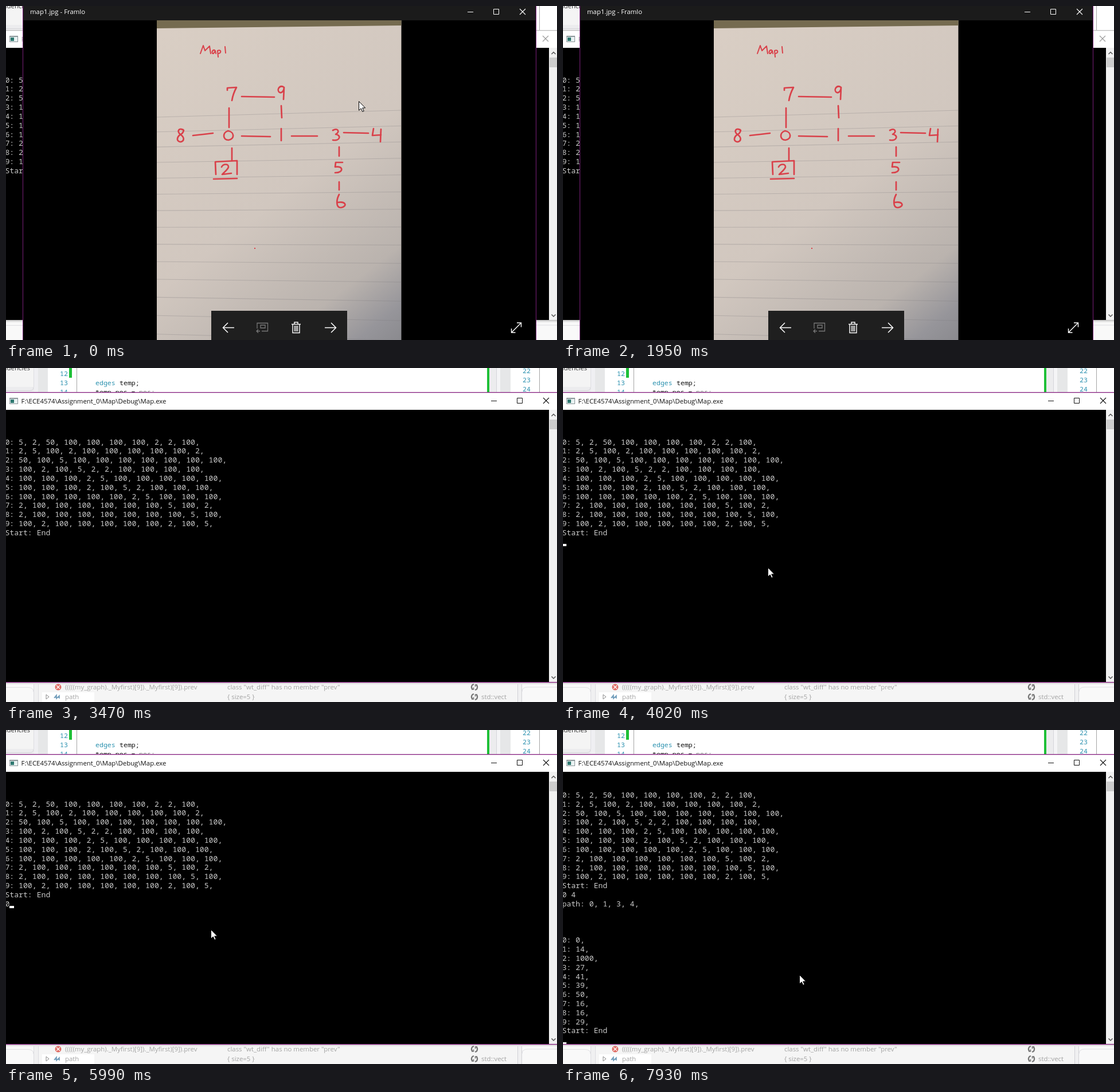
An HTML page with a canvas for the animation above (8 s loop, 961 by 583 pixels).

```html
<!DOCTYPE html>
<html lang="en">
<head>
<meta charset="utf-8">
<title>Map paths</title>
<style>
html, body { margin: 0; width: 100%; height: 100%; overflow: hidden; background: #fff; }
canvas { display: block; width: 961px; height: 583px; }
</style>
</head>
<body>
<canvas id="stage" width="961" height="583"></canvas>
<script>
const stage = document.getElementById('stage').getContext('2d');
const layer = document.createElement('canvas');
layer.width = 961;
layer.height = 583;
const layerCtx = layer.getContext('2d');
let ctx = stage;

const LOOP = 8000;
const UI = '11.4px "Open Sans", sans-serif';
const CONSOLE = '13.17px "Noto Sans Mono", monospace';
const CODE = '11.6px "Noto Sans Mono", monospace';
const ROW = 15.83, COL = 7.9;

// Cursor stops: [start ms, x, y]; no position means hidden.
const POINTER = [
  [0, 615, 166], [120, 295, 97], [270, 304, 305], [430, 746, 397],
  [570, 610, 155], [700, 395, 190], [850, 470, 508], [970, 802, 380],
  [1090, 648, 136], [1240, 352, 250], [1370, 579, 379], [1520, 801, 266],
  [1670, 520, 202], [1800, 388, 562], [1950], [3870, 440, 383],
  [4020, 357, 348], [7930, 412, 427]
];

// Caret stops: [start ms, column, row]; no position means blinked off.
const CARET = [
  [0], [3870, 0, 11], [4330], [4910, 0, 11], [5470], [5990, 1, 11],
  [6420], [6540, 2, 11], [6700, 3, 11], [6970], [7090, 0, 12], [7240, 0, 27]
];

const TYPED = [[0, ''], [5720, '0'], [6540, '0 '], [6700, '0 4']];

// Cheap edges of the graph; every other pair costs 100.
const EDGES = { '01': 2, '02': 50, '07': 2, '08': 2, 13: 2, 19: 2, 34: 2, 35: 2, 56: 2, 79: 2 };
const DISTANCES = [0, 14, 1000, 27, 41, 39, 50, 16, 16, 29];

const ids = [...Array(10).keys()];
const cost = (a, b) => a === b ? 5 : EDGES[`${Math.min(a, b)}${Math.max(a, b)}`] || 100;
const MATRIX = ids.map(a => `${a}: ` + ids.map(b => `${cost(a, b)},`).join(' '));
const PROMPT = 'Start: End';
const RESULT = ['path: 0, 1, 3, 4,', '', '', '', ...DISTANCES.map((d, i) => `${i}: ${d},`), PROMPT];

const latest = (stops, t) => stops.filter(s => s[0] <= t).pop();

function rect(color, x, y, w, h) {
  ctx.fillStyle = color;
  ctx.fillRect(x, y, w, h);
}

function text(str, x, y, color, font = UI, align = 'left') {
  ctx.font = font;
  ctx.textAlign = align;
  ctx.fillStyle = color;
  ctx.fillText(str, x, y);
}

function stroke(d, color, width = 1) {
  ctx.strokeStyle = color;
  ctx.lineWidth = width;
  ctx.stroke(new Path2D(d));
}

function windowButtons(x, y, color, gap) {
  stroke(`M${x - 5} ${y + .5}h10 M${x + gap - 4.5} ${y - 4.5}h9v9h-9z`, color);
  closeButton(x + 2 * gap + 1, y, color);
}

function closeButton(x, y, color) {
  stroke(`M${x - 5} ${y - 5}l10 10m0 -10l-10 10`, color, 1.1);
}

function refreshIcon(x, y) {
  stroke(`M${x - 1} ${y - 5}a5 5 0 0 0 -2 9 M${x + 1} ${y + 5}a5 5 0 0 0 2 -9`, '#777', 2.2);
  stroke(`M${x - 5} ${y + 4}h3.5v-3.5 M${x + 5} ${y - 4}h-3.5v3.5`, '#777', 1.5);
}

function drawEditor() {
  rect('#fff', 0, 0, 961, 583);
  rect('#f4f4f4', 0, 0, 49, 43);
  rect('#dedee2', 48, 0, 1, 43);
  rect('#efeff2', 49, 0, 7, 43);
  rect('#e6e7e8', 56, 0, 17, 43);
  rect('#ececee', 0, 33, 49, 10);
  stroke('M0 39.5h42q6 0 6 -6', '#d5d5d9');
  text('endencies', 42, 4, '#333', UI, 'right');
  ['12', '13', '14'].forEach((n, i) => text(n, 94, 14 + i * 16, '#2b91af', CODE));
  rect('#1ec037', 110, 0, 5, 17);
  rect('#a5a5a5', 123, 0, 1, 43);
  text('edges', 156, 30, '#2b91af', CODE);
  text('temp;', 198, 30, '#111', CODE);
  text('temp.pos = ', 156, 46, '#111', CODE);
  text('pos;', 232, 46, '#777', CODE);

  rect('#1ec037', 839, 0, 4, 43);
  rect('#ececee', 843, 0, 12, 43);
  rect('#d5d5d9', 855, 0, 1, 43);
  rect('#f4f4f6', 856, 0, 6, 43);
  rect('#e6e7e8', 862, 0, 18, 43);
  ['22', '23', '24'].forEach((n, i) => text(n, 901, 9 + i * 16, '#2b91af', CODE));
  rect('#a5a5a5', 930, 0, 1, 43);

  rect('#f0f0f1', 0, 549, 961, 34);
  rect('#f9f9f9', 0, 549, 48, 34);
  rect('#dcdce0', 48, 549, 1, 34);
  rect('#dcdce0', 56, 549, 1, 34);
  rect('#f5f5f5', 57, 549, 835, 34);
  rect('#fff', 63, 566, 91, 17);
  rect('#d2d2d6', 892, 549, 1, 34);
  rect('#d2d2d6', 899, 549, 1, 34);
  rect('#f9f9f9', 900, 549, 61, 34);
  rect('#e4e4e4', 0, 549, 961, 3);
  stroke('M0 557.5h38q10 0 10 8 M900 565q0 -8 10 -8h51', '#dedee2');
  ctx.beginPath();
  ctx.arc(91, 557, 5.5, 0, 7);
  ctx.fillStyle = '#df6a62';
  ctx.fill();
  stroke('M88 554l6 6m0 -6l-6 6', '#fff', 1.4);
  text('(((((my_graph)._Myfirst)[9])._Myfirst)[9]).prev', 103, 561, '#a3a3a3');
  text('class "wt_diff" has no member "prev"', 386, 561, '#a3a3a3');
  stroke('M70 570l5 4l-5 4z', '#888');
  stroke('M84 576l4 -5v6l5 -5v5m-9 -2h9', '#6f9cba', 1.6);
  text('path', 103, 578, '#a3a3a3');
  text('{ size=5 }', 386, 578, '#a3a3a3');
  refreshIcon(817, 557);
  refreshIcon(817, 574);
  text('std::vect', 829, 578, '#a3a3a3');
}

function consoleLines(t) {
  const typed = latest(TYPED, t)[1];
  const lines = [...MATRIX, PROMPT, typed];
  return t < 7240 ? lines : [...lines, ...RESULT];
}

function drawConsole(t) {
  const active = t >= 3320;
  const selecting = t >= 4330 && t < 5720;
  const edge = active ? '#85207f' : '#bdbdbd';
  rect('#fff', 0, 43, 961, 30);
  rect(edge, 0, 42, 961, 1.3);
  rect('#000', 0, 73, 947, 475);

  rect('#8b9699', 6, 52, 15, 11);
  rect('#e9f2f2', 7, 54, 13, 8);
  rect('#2e7870', 8, 55, 6, 6);
  const title = 'F:\\ECE4574\\Assignment_0\\Map\\Debug\\Map.exe';
  text((selecting ? 'Select ' : '') + title, 26.5, 62, active ? '#111' : '#999');
  if (active) windowButtons(851, 57, '#111', 45);
  else closeButton(941, 57, '#999');

  rect('#f1f1f1', 947, 73, 14, 475);
  rect('#cdcdcd', 948, 90, 13, 17);
  stroke('M951.5 84l3.5 -3.5l3.5 3.5 M951.5 538.5l3.5 3.5l3.5 -3.5', '#555', 1.5);

  ctx.save();
  ctx.beginPath();
  ctx.rect(0, 73, 947, 475);
  ctx.clip();
  const top = t < 7240 ? 129 : 113.3;
  consoleLines(t).forEach((line, i) => text(line, -1.6, top + i * ROW + 4.6, '#c8c8c8', CONSOLE));
  const [, col, row] = latest(CARET, t);
  if (row !== undefined) {
    const x = Math.round(col * COL - 2);
    rect('#fff', x, Math.round(top + row * ROW + 4), 8, 4);
  }
  if (selecting) rect('#fff', 354, 343, 8, 15);
  ctx.restore();
  rect(edge, 0, 548, 961, 1.3);
}

const LINKS = `M411 158L468 159 M480 174L481 195 M389 178L389 212 M394 248L394 270
  M326 226Q345 224 361 222 M411 227L461 228 M498 227L543 227 M589 221L632 222
  M581 246L581 262 M581 307L581 321`;
const BOX = 'M366 294L365 272L403 270L403 294 M362 302L403 301';
const DIGITS = [
  'M387 218C377 221 378 234 388 234C400 232 398 219 387 218',
  'M480 214L480 235',
  'M376 281C379 275 388 275 388 281C387 286 380 290 377 294L393 292',
  'M570 217C579 212 583 220 575 224C585 225 583 236 570 234',
  'M641 214L639 226L654 225 M654 215L653 237',
  'M587 273L575 273L574 281C588 278 590 291 574 291',
  'M581 329C576 338 575 352 584 352C596 350 593 340 578 343',
  'M386 147L386 143L402 142Q396 153 394 165',
  'M310 217C302 211 297 219 304 224C314 231 309 238 303 237C296 235 299 227 305 224Q311 220 309 216',
  'M485 142C478 137 472 145 476 150C481 154 485 147 485 142L484 163'
];
const HEADING = `M339 83L344 69L347 78L355 70L357 83 M364 77C359 76 358 84 362 83L365 78L366 83
  M369 78L370 89 M369 78C376 75 376 83 370 83 M382 71L383 82`;

function drawPaper() {
  ctx.save();
  ctx.beginPath();
  ctx.rect(263, 25, 426.5, 600);
  ctx.clip();
  const shade = ctx.createLinearGradient(263, 60, 690, 610);
  [[0, '#d9cec4'], [.5, '#d1c7bf'], [.78, '#bab3ae'], [.9, '#96959a'], [1, '#858589']]
    .forEach(([at, color]) => shade.addColorStop(at, color));
  rect(shade, 263, 25, 427, 600);
  ctx.fillStyle = '#756b50';
  ctx.fill(new Path2D('M263 25H690V34L263 39z'));
  for (let i = 0; i < 15; i++) {
    const left = 194 + 25.5 * i + .28 * i * i;
    const right = 182 + 27 * i + .3 * i * i;
    stroke(`M263 ${left}L690 ${right}`, 'rgba(120,115,120,.3)', 1.1);
  }
  ctx.lineCap = ctx.lineJoin = 'round';
  [LINKS, BOX, ...DIGITS].forEach(d => stroke(d, '#d9414a', 2.7));
  stroke(HEADING, '#d9414a', 2);
  rect('#d9414a', 433, 422, 2, 2);
  ctx.restore();
}

function drawToolbar(hover) {
  rect('#1f1f1f', 358, 532, 237, 60);
  if (hover) rect('#454545', 358, 532, 59, 60);
  stroke('M398 561.5H379m8 -8.5l-8.5 8.5l8.5 8.5', '#fff', 1.5);
  stroke('M556 561.5H575m-8 -8.5l8.5 8.5l-8.5 8.5', '#fff', 1.5);
  stroke('M438 563V553.5H456.5V567.5H446 M444 557h8v5h-8z M443 567.5h-6m3 -3l-3 3l3 3', '#777', 1.3);
  stroke('M498 555.5H514M503 555v-3h6v3M500 556v14.5h12V556M503.5 558v10M506 558v10M508.5 558v10', '#fff', 1.4);
  stroke('M882 569.5L898 553.5M891 553h7.5v7.5M881.5 563v7h7', '#fff', 1.4);
}

function drawViewer(titleColor, hover) {
  rect('#000', 29, -6, 896, 606);
  rect('#1b1b1b', 29, -6, 895, 31);
  text('map1.jpg - Framlo', 42, 14, titleColor);
  windowButtons(810, 10, titleColor, 45);
  drawPaper();
  drawToolbar(hover);
  rect('#7a1f7a', 29, -6, 1, 606);
  rect('#7a1f7a', 924, -6, 1, 606);
}

// The closing window fades as one flat picture, so it is composed on its own layer.
function drawClosingViewer() {
  const scale = .785;
  ctx = layerCtx;
  ctx.setTransform(scale, 0, 0, scale, 140.3, 173.4);
  drawViewer('#6a6a6a', false);
  ctx = stage;
  ctx.globalAlpha = .54;
  ctx.drawImage(layer, 0, 0);
  ctx.globalAlpha = 1;
}

const ARROW = new Path2D('M.5 .5V16.2L4.2 12.8L6.8 18.4L9.2 17.3L6.7 11.9H11.6z');

function drawPointer(t) {
  const [, x, y] = latest(POINTER, t);
  if (x === undefined) return;
  ctx.save();
  ctx.translate(x, y);
  ctx.fillStyle = '#fff';
  ctx.fill(ARROW);
  ctx.strokeStyle = '#000';
  ctx.lineWidth = 1;
  ctx.stroke(ARROW);
  ctx.restore();
}

function draw(t) {
  drawEditor();
  drawConsole(t);
  if (t < 3320) drawViewer('#fff', t >= 1800 && t < 1950);
  else if (t < 3470) drawClosingViewer();
  drawPointer(t);
}

function tick() {
  draw(performance.now() % LOOP);
  requestAnimationFrame(tick);
}
tick();
</script>
</body>
</html>
```
